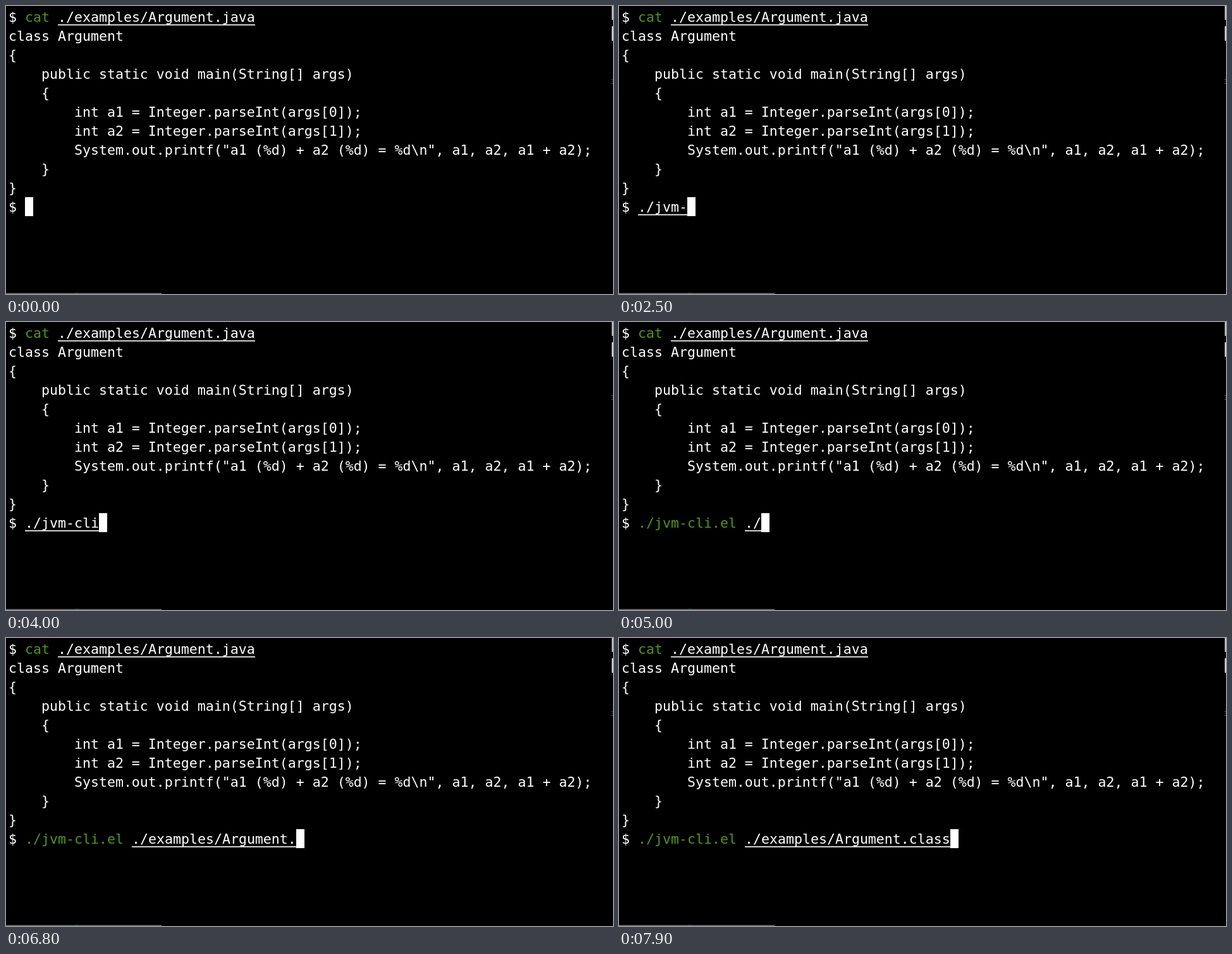
These frames come from a looping animation (960x455 px, 8 s). An HTML page with a canvas:

```html
<!DOCTYPE html>
<html lang="en">
<head>
<meta charset="utf-8">
<title>Terminal session</title>
<style>
  html, body { margin: 0; width: 100%; height: 100%; overflow: hidden; background: #000; }
  canvas { display: block; }
</style>
</head>
<body>
<canvas id="stage" width="960" height="455"></canvas>
<script>
const ctx = document.getElementById('stage').getContext('2d');
const LOOP = 8000, CELL = 13, ROW = 30, LEFT = 4, TOP = 2;
const FONT = '21.593px "DejaVu Sans Mono", monospace';
const WHITE = '#fff', GREEN = '#4e9a06', RED = '#c00';

const PLAIN = { color: WHITE };
const PATH = { color: WHITE, line: true };
const COMMAND = { color: GREEN };
const UNKNOWN = { color: RED, bold: true };

const listing = [
  'class Argument',
  '{',
  '    public static void main(String[] args)',
  '    {',
  '        int a1 = Integer.parseInt(args[0]);',
  '        int a2 = Integer.parseInt(args[1]);',
  '        System.out.printf("a1 (%d) + a2 (%d) = %d\\n", a1, a2, a1 + a2);',
  '    }',
  '}'
];

const tool = './jvm-cli.el';
const file = './examples/Argument.class';
const head = n => [[tool.slice(0, n), PATH]];
const call = (arg, style = PATH) => [[tool, COMMAND], [' ', PLAIN], [arg, style]];
const typed = n => call(file.slice(0, n));
const stem = file.slice(0, 20);

// Command line contents from each moment on
const steps = [
  [0, []],
  [1400, [['.', COMMAND]]],
  [1500, head(2)],
  [2000, head(3)],
  [2200, head(5)],
  [2500, head(6)],
  [2600, head(7)],
  [2700, head(8)],
  [3000, head(9)],
  [3400, [['./jvm-cli,', PATH]]],
  [3500, [['./jvm-cli,', UNKNOWN]]],
  [4000, head(9)],
  [4100, head(10)],
  [4400, typed(0)],
  [4800, typed(1)],
  [5000, typed(2)],
  [5200, typed(3)],
  [5400, typed(4)],
  [5600, typed(5)],
  [5900, typed(11)],
  [6300, typed(12)],
  [6600, typed(13)],
  [6800, typed(20)],
  [7000, call(stem + '.', PLAIN)],
  [7200, call(stem + '.c', PLAIN)],
  [7300, call(stem + '.cl', PLAIN)],
  [7500, [...typed(25), [' ', PLAIN]]],
  [7900, typed(25)]
];

function box(x, y, w, h, color) {
  ctx.fillStyle = color;
  ctx.fillRect(x, y, w, h);
}

// Draws styled runs on a row and returns the x after the last one
function write(row, runs) {
  let x = LEFT;
  const y = TOP + row * ROW;
  for (const [text, style] of runs) {
    const width = text.length * CELL;
    ctx.font = (style.bold ? 'bold ' : '') + FONT;
    ctx.fillStyle = style.color;
    ctx.fillText(text, x, y + 23);
    if (style.line) box(x, y + 27, width, 1.6, style.color);
    x += width;
  }
  return x;
}

// Slivers of neighbouring windows along the edges
function edges() {
  box(958, 0, 2, 22, '#bbb');
  box(958, 32, 2, 23, '#ccc');
  ctx.font = '9px "DejaVu Sans Mono", monospace';
  ctx.fillStyle = '#777';
  ctx.fillText('3', 957, 123);
  box(0, 453.6, 246, 1.4, '#777');
  box(109, 453.6, 6, 1.4, '#4a8a5a');
}

function draw(t) {
  box(0, 0, 960, 455, '#000');
  edges();
  write(0, [['$ ', PLAIN], ['cat', COMMAND], [' ', PLAIN], ['./examples/Argument.java', PATH]]);
  listing.forEach((text, i) => write(i + 1, [[text, PLAIN]]));
  const runs = steps.filter(s => s[0] <= t).pop()[1];
  const x = write(10, [['$ ', PLAIN], ...runs]);
  box(x, TOP + 10 * ROW, CELL, ROW, WHITE);
}

const start = performance.now();
function tick() {
  draw((performance.now() - start) % LOOP);
  requestAnimationFrame(tick);
}
tick();
</script>
</body>
</html>
```
